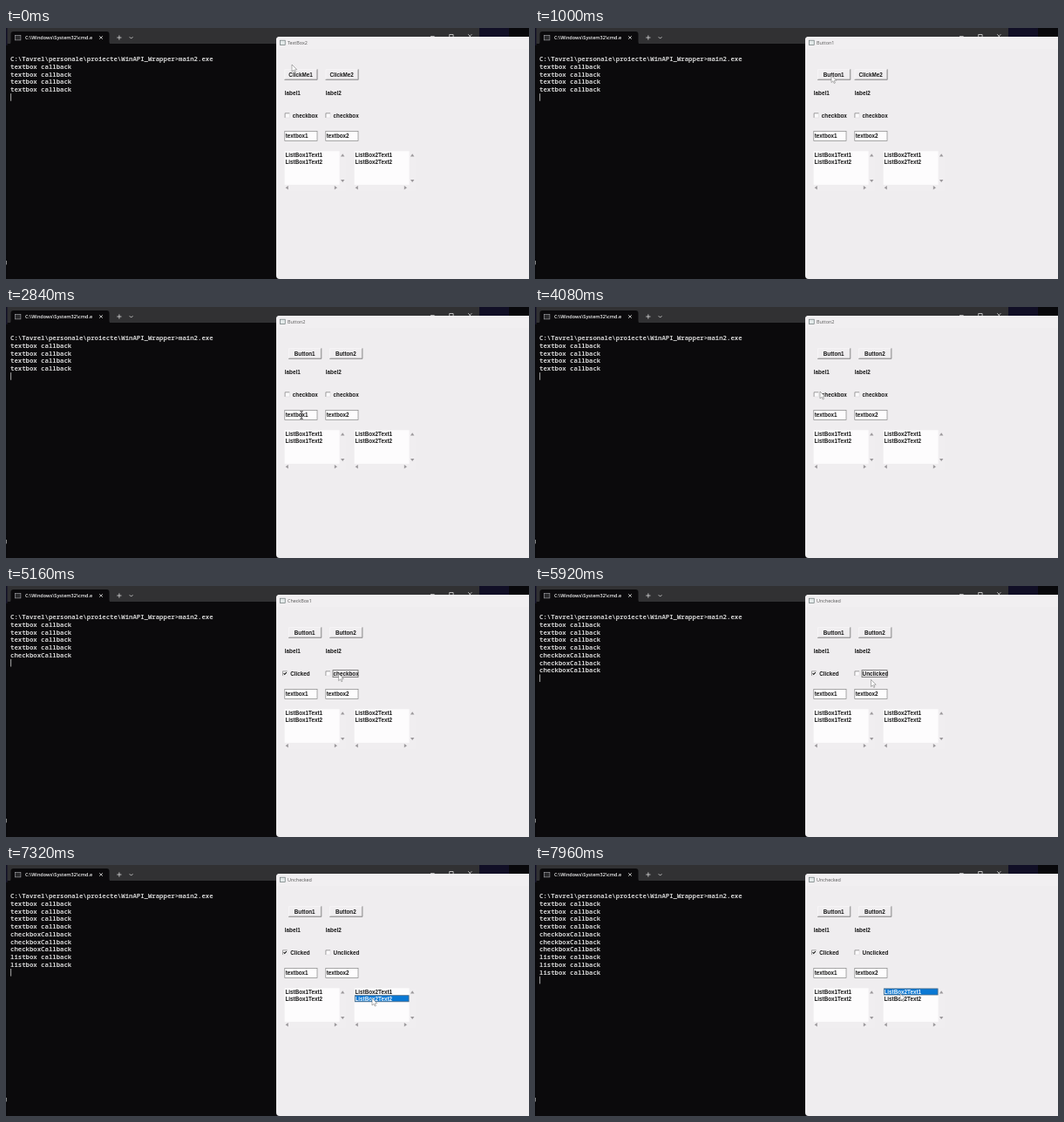
Write an HTML page that moves like this. It is 600 by 288 pixels and loops after 8 s.

```html
<!DOCTYPE html>
<html lang="en">
<head>
<meta charset="utf-8">
<title>Window controls demo</title>
<style>
  html, body { margin: 0; width: 100%; height: 100%; overflow: hidden; background: #0b0a0c; }
  svg { display: block; width: 100vw; height: 100vh; }
  text { white-space: pre; }
  .term { font: 600 7.32px "Noto Sans Mono", "DejaVu Sans Mono", monospace; fill: #d0d0d0; }
  .ui { font: bold 6.3px "Liberation Sans", Arial, sans-serif; fill: #161616; }
  .tab { font: 600 5.5px "Open Sans", "Noto Sans", sans-serif; fill: #f4f4f4; }
  .title { font: 5.42px "Open Sans", "Noto Sans", sans-serif; fill: #555; }
  .line { fill: none; stroke: #dcdcdc; stroke-width: .8; }
  .focus { fill: none; stroke: #666; stroke-width: .8; }
</style>
</head>
<body>
<svg id="stage" viewBox="0 0 600 288" preserveAspectRatio="none">
  <!-- desktop and terminal -->
  <rect width="600" height="288" fill="#08080b"/>
  <rect width="577" height="20" fill="#110f26"/>
  <rect y="267" width=".7" height="4.5" fill="#bbb"/>
  <rect x="1.5" width="541.5" height="20" fill="#313133"/>
  <rect x="1.5" y="18" width="541.5" height="270" fill="#0b0a0c"/>
  <path d="M3 18.5Q5.5 18.5 5.5 16V7Q5.5 4 8.5 4H115.5Q118.5 4 118.5 7V16Q118.5 18.5 121 18.5Z" fill="#0b0a0c"/>
  <rect x="10.3" y="8.3" width="6.6" height="5.6" fill="#2a2a2c" stroke="#a9a9ad" stroke-width=".6"/>
  <text class="tab" x="22" y="12.9">C:\Windows\System32\cmd.e</text>
  <path class="line" d="M107.2 9.2l3.6 3.6m0-3.6l-3.6 3.6M127.3 11h5.2m-2.6-2.6v5.2M141.7 10.2l1.9 1.9 1.9-1.9"/>
  <path class="line" d="M487 9.6h4.6M508.7 12v-4.5h4.4v4.5M530.2 7.2l4.2 4.2m0-4.2l-4.2 4.2"/>
  <g id="console"></g>
  <rect id="caret" x="5.3" width=".8" height="8.6" fill="#d0d0d0"/>

  <!-- application window -->
  <path d="M310 284V14Q310 10 314 10H600V288H314Q310 288 310 284Z" fill="#efedef"/>
  <path d="M310 24V14Q310 10 314 10H600V24Z" fill="#f1eff1"/>
  <rect x="314.6" y="14.2" width="5.6" height="5.2" fill="#e4eaea" stroke="#6c7778" stroke-width=".7"/>
  <text id="title" class="title" x="323" y="18.7"></text>
  <g id="form"></g>
  <path id="arrow" d="M0 0V8L1.9 6.3 3.2 9 4.4 8.5 3.2 5.9 5.7 5.7Z" fill="#fff" stroke="#555" stroke-width=".45"/>
  <path id="beam" d="M-1.7 -4.3H-.4L0 -3.8 .4 -4.3H1.7M0 -4V4M-1.7 4.3H-.4L0 3.8 .4 4.3H1.7" fill="none" stroke="#111" stroke-width=".8"/>
</svg>
<script>
const LOOP = 8000, STEP = 40;
const $ = id => document.getElementById(id);

function add(parent, tag, attrs, text) {
  const node = document.createElementNS("http://www.w3.org/2000/svg", tag);
  for (const k in attrs) node.setAttribute(k, attrs[k]);
  if (text !== undefined) node.textContent = text;
  parent.append(node);
  return node;
}
const show = (node, on) => node.setAttribute("visibility", on ? "visible" : "hidden");
const move = (node, x, y) => node.setAttribute("transform", `translate(${x} ${y})`);
const form = $("form");
const label = (parent, x, y, text) => add(parent, "text", { class: "ui", x, y }, text);

// ---- timelines: [start, value] ----
const titles = [[0, "TextBox2"], [720, "Button1"], [1600, "Button2"],
  [4320, "CheckBox1"], [5240, "CheckBox2"], [5760, "Unchecked"]];
const button1 = [[0, "up"], [560, "down"], [720, "done"]];
const button2 = [[0, "up"], [1440, "down"], [1600, "done"]];
const check1 = [[0, "idle"], [4320, "on"]];
const check2 = [[0, "idle"], [5240, "on"], [5760, "off"]];
const focus = [[0, 0], [4160, 1], [5000, 2], [6440, 0]];
const picked = [[0, -1], [6440, 1], [6880, 0], [7320, 1], [7640, 0]];
const echoes = [[4320, "checkboxCallback"], [5240, "checkboxCallback"], [5760, "checkboxCallback"],
  [6520, "listbox callback"], [6960, "listbox callback"], [7360, "listbox callback"]];
const path = [[0, 328, 42], [40, 328, 42], [400, 340, 54.5], [1080, 340, 54.5], [1360, 388, 57],
  [2240, 388, 57], [2800, 339, 124], [3200, 340, 125], [3400, 386, 125], [3600, 382, 139],
  [3800, 352, 120], [4000, 327, 97], [4480, 327, 97], [4840, 386, 103], [5120, 381.6, 100.7],
  [5840, 381.6, 100.7], [6240, 419, 166], [6480, 420.6, 156.2], [6680, 420.6, 156.2], [6840, 420, 146],
  [7000, 420, 146], [7200, 420, 153], [7600, 420, 153], [7720, 419, 147.5]];

const at = (list, t) => list.reduce((v, [start, next]) => t >= start ? next : v, list[0][1]);

function pointer(t) {
  const i = path.findIndex(p => p[0] > t);
  if (i < 0) return path[path.length - 1].slice(1);
  const [t0, x0, y0] = path[i - 1], [t1, x1, y1] = path[i];
  const u = (t - t0) / (t1 - t0), e = u * u * (3 - 2 * u);
  return [x0 + (x1 - x0) * e, y0 + (y1 - y0) * e];
}

// ---- console ----
const rowY = i => 38 + 8.77 * i;
const intro = ["C:\\Tavrel\\personale\\proiecte\\WinAPI_Wrapper>main2.exe", ...Array(4).fill("textbox callback")];
const rows = [...intro, ...echoes.map(e => e[1])].map((text, i) =>
  add($("console"), "text", { class: "term", x: 5, y: rowY(i) }, text));

// ---- controls ----
function makeButton(x, before, after) {
  const g = add(form, "g", {});
  add(g, "rect", { width: 38, height: 12.3, fill: "#f0eef0" });
  const light = add(g, "path", { d: "M.4 12V.4H37.6", fill: "none", "stroke-width": .6 });
  const inner = add(g, "path", { d: "M37 1V11.4H1", fill: "none", stroke: "#c4c2c4", "stroke-width": .5 });
  const dark = add(g, "path", { d: "M37.7 0V12H0", fill: "none", "stroke-width": .7 });
  const text = add(g, "text", { class: "ui", "text-anchor": "middle" });
  return state => {
    const down = state === "down", done = state === "done";
    move(g, x + (done ? 4.7 : 0), 47.3);
    light.setAttribute("stroke", down ? "#666" : "#faf9fa");
    dark.setAttribute("stroke", down ? "#faf9fa" : "#666");
    show(inner, !down);
    text.textContent = done ? after : before;
    text.setAttribute("x", down ? 19.1 : 18.6);
    text.setAttribute("y", down ? 9 : 8.5);
  };
}

function makeCheck(x, shift) {
  const g = add(form, "g", {});
  add(g, "rect", { width: 5.6, height: 5.6, fill: "#fbfafb" });
  add(g, "path", { d: "M.3 5.5V.3H5.5", fill: "none", stroke: "#777", "stroke-width": .7 });
  add(g, "path", { d: "M5.5 .4V5.5H.4", fill: "none", stroke: "#d5d3d5", "stroke-width": .5 });
  const tick = add(g, "path", { d: "M1.4 2.7L2.5 4 4.6 1.6", fill: "none", stroke: "#111", "stroke-width": 1.1 });
  const text = label(g, 9, 5.2, "");
  const ring = add(g, "rect", { class: "focus", x: 8.4, y: -.9, height: 8 });
  return (state, focused) => {
    const on = state === "on";
    move(g, x - (on ? shift : 0), 97.5);
    text.textContent = on ? "Clicked" : state === "off" ? "Unclicked" : "checkbox";
    ring.setAttribute("width", on ? 24 : 29);
    show(tick, on);
    show(ring, focused);
  };
}

function makeTextBox(x, text) {
  add(form, "rect", { x, y: 118.4, width: 37.2, height: 11.2, fill: "#fdfcfd", stroke: "#858585", "stroke-width": .7 });
  label(form, x + .9, 125.6, text);
}

function makeList(x, name) {
  add(form, "rect", { x, y: 141.3, width: 70, height: 45, fill: "#f0eef0" });
  add(form, "rect", { x, y: 141.3, width: 63, height: 38.6, fill: "#fdfcfd" });
  const arrows = [[66.6, 146, 0], [66.6, 175.3, 180], [2.8, 183.2, 270], [58.6, 183.2, 90]];
  for (const [dx, y, turn] of arrows)
    add(form, "path", { d: "M-2.2 1.4H2.2L0 -1.8Z", fill: "#9c999c", transform: `translate(${x + dx} ${y}) rotate(${turn})` });
  const items = [0, 1].map(i => {
    const bar = add(form, "rect", { x: x + .7, y: 141.9 + i * 7.8, width: 61.8, height: 7.1,
      fill: "#0a78d4", stroke: "#4f6a80", "stroke-width": .8 });
    return { bar, text: label(form, x + .9, 147.7 + i * 7.8, name + "Text" + (i + 1)) };
  });
  return pick => items.forEach(({ bar, text }, i) => {
    show(bar, i === pick);
    text.style.fill = i === pick ? "#eef5fb" : "";
  });
}

const setButton1 = makeButton(319.4, "ClickMe1", "Button1");
const setButton2 = makeButton(366.5, "ClickMe2", "Button2");
label(form, 319.8, 77.3, "label1");
label(form, 366.8, 77.3, "label2");
const setCheck1 = makeCheck(319.8, 2.6);
const setCheck2 = makeCheck(366.6, 0);
makeTextBox(319.8, "textbox1");
makeTextBox(366.8, "textbox2");
makeList(319.6, "ListBox1")(-1);
const setList2 = makeList(399.6, "ListBox2");

function draw(t) {
  $("title").textContent = at(titles, t);
  setButton1(at(button1, t));
  setButton2(at(button2, t));
  const focused = at(focus, t);
  setCheck1(at(check1, t), focused === 1);
  setCheck2(at(check2, t), focused === 2);
  setList2(at(picked, t));

  const count = intro.length + echoes.filter(e => t >= e[0]).length;
  rows.forEach((row, i) => show(row, i < count));
  $("caret").setAttribute("y", rowY(count) - 6.7);

  const [x, y] = pointer(t);
  const typing = y > 118 && y < 130 && (x > 319 && x < 358 || x > 366 && x < 405);
  move($("arrow"), x, y);
  move($("beam"), x, y);
  show($("arrow"), !typing);
  show($("beam"), typing);
}

const start = performance.now();
function tick() {
  const t = (performance.now() - start) % LOOP;
  draw(Math.floor(t / STEP) * STEP);
  requestAnimationFrame(tick);
}
tick();
</script>
</body>
</html>
```
